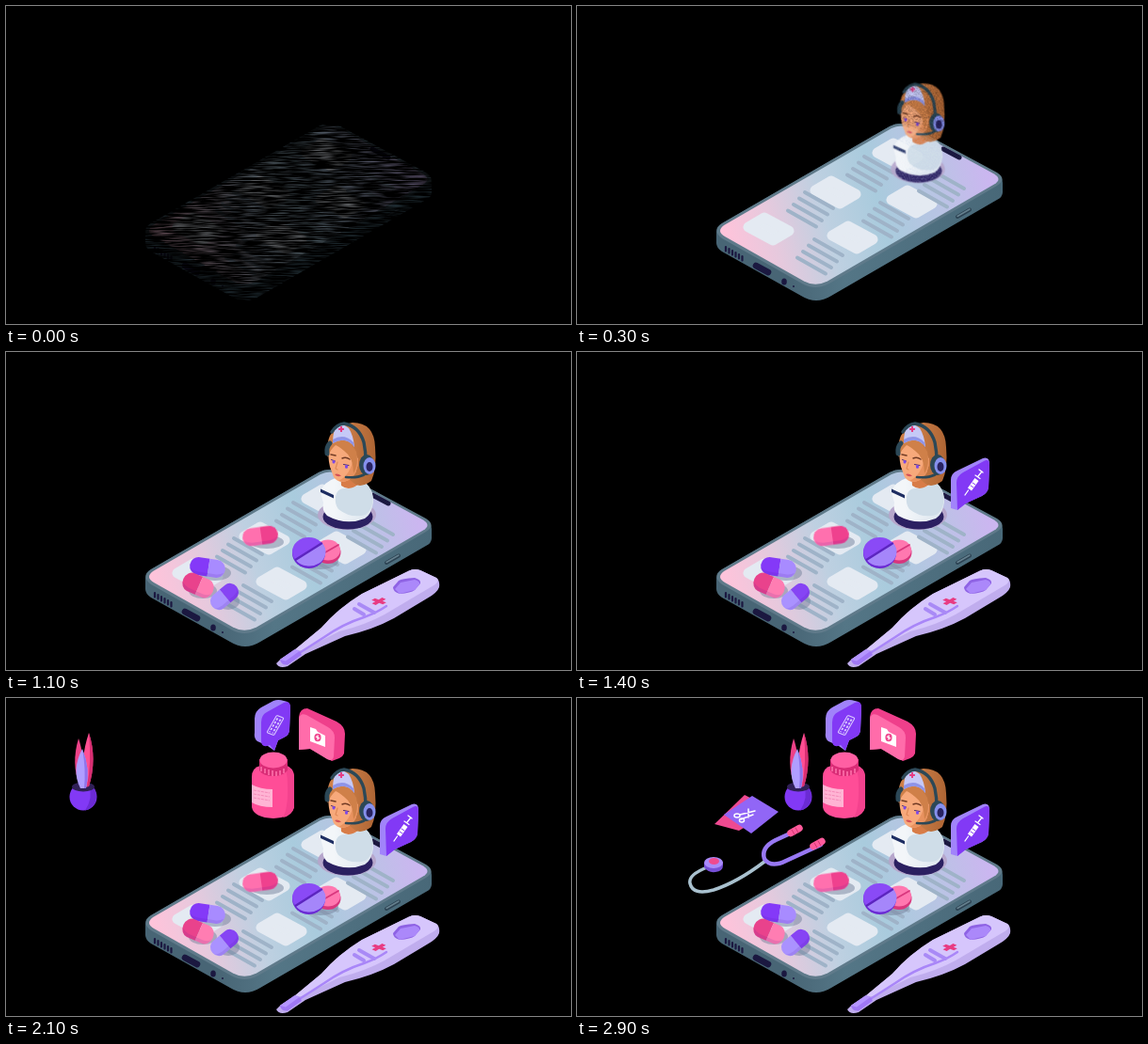
Write an HTML page that moves like this. It is 600 px wide and 338 px high and loops after 3 s.

```html
<!DOCTYPE html>
<html lang="en">
<head>
<meta charset="utf-8">
<title>Online clinic</title>
<style>
html, body { margin: 0; width: 100%; height: 100%; overflow: hidden; background: #000; }
svg { display: block; width: 100vw; height: 100vh; }
.line { fill: none; stroke-linecap: round; stroke-linejoin: round; }
.anim { animation: 3s step-end infinite; }

/* Poses hold for 100 ms each, so every step is 3.33% */
#phone { animation-name: phone; }
@keyframes phone {
  0% { filter: url(#streakThin); }
  3.33% { filter: url(#streakFull); }
  6.66%, 100% { filter: none; }
}
#nurse { animation-name: nurse; transform-origin: 361px 176px; }
@keyframes nurse {
  0% { opacity: 0; }
  6.66% { opacity: 1; transform: scale(.72); filter: url(#grainThin); }
  9.99% { opacity: 1; transform: scale(.93); filter: url(#grainFull); }
  13.33% { opacity: 1; transform: scale(.98); filter: none; }
  16.66%, 100% { opacity: 1; transform: none; filter: none; }
}
#thermo { animation-name: thermo; }
@keyframes thermo {
  0% { opacity: 0; }
  23.33% { opacity: 1; filter: url(#grainThin); }
  26.66%, 100% { opacity: 1; filter: none; }
}
.drop1 { animation-name: drop1; }
@keyframes drop1 {
  0% { opacity: 0; }
  26.66% { opacity: 1; transform: translate(-2px, -155px); }
  29.99% { opacity: 1; transform: translate(-1px, -58px); }
  33.33%, 100% { opacity: 1; transform: none; }
}
.drop2 { animation-name: drop2; }
@keyframes drop2 {
  0% { opacity: 0; }
  29.99% { opacity: 1; transform: translateY(-140px); }
  33.33% { opacity: 1; transform: translateY(-48px); }
  36.66%, 100% { opacity: 1; transform: none; }
}
.shadow { animation-name: shadow; fill: #75819c; fill-opacity: .5; }
@keyframes shadow {
  0% { opacity: 0; }
  36.66%, 100% { opacity: 1; }
}
#syringe { animation-name: syringe; }
@keyframes syringe {
  0% { opacity: 0; }
  43.33% { opacity: .65; transform: translateX(-5px); }
  46.66%, 100% { opacity: 1; transform: none; }
}
#chat { animation-name: chat; }
@keyframes chat {
  0% { opacity: 0; }
  53.33% { opacity: 1; filter: url(#grainFull); }
  56.66%, 100% { opacity: 1; filter: none; }
}
#bottle { animation-name: bottle; }
@keyframes bottle {
  0% { opacity: 0; }
  56.66% { opacity: 1; filter: url(#grainThin); }
  59.99% { opacity: 1; filter: url(#grainFull); }
  63.33%, 100% { opacity: 1; filter: none; }
}
#plant { animation-name: plant; }
@keyframes plant {
  0% { opacity: 0; }
  66.66% { opacity: 1; transform: translate(-174px, 76px); }
  69.99% { opacity: 1; transform: translate(-153px, 0); }
  73.33% { opacity: 1; transform: translate(-120px, -28px); }
  76.66% { opacity: 1; transform: translate(-78px, -37px); }
  79.99% { opacity: 1; transform: translate(-34px, -22px); }
  83.33%, 100% { opacity: 1; transform: none; }
}
#cards { animation-name: cards; }
@keyframes cards {
  0% { opacity: 0; }
  79.99% { opacity: 1; transform: translate(-50px, 108px); }
  83.33% { opacity: 1; transform: translate(-38px, 48px); }
  86.66% { opacity: 1; transform: translate(-14px, 12px); }
  89.99%, 100% { opacity: 1; transform: none; }
}
#scope { animation-name: scope; }
@keyframes scope {
  0% { opacity: 0; }
  93.33% { opacity: .65; transform: translateY(-14px); }
  96.66%, 100% { opacity: 1; transform: none; }
}
</style>
</head>
<body>
<svg viewBox="0 0 600 338" preserveAspectRatio="none">
<defs>
  <linearGradient id="screen" gradientUnits="userSpaceOnUse" x1="156" y1="246" x2="436" y2="174">
    <stop offset="0" stop-color="#ffc3da"/><stop offset=".18" stop-color="#e6c9dd"/>
    <stop offset=".38" stop-color="#bed0e1"/><stop offset=".58" stop-color="#a9cbdd"/>
    <stop offset=".8" stop-color="#b9c4e4"/><stop offset="1" stop-color="#cbb6f0"/>
  </linearGradient>
  <linearGradient id="side">
    <stop offset=".25" stop-color="#486575"/><stop offset=".45" stop-color="#547686"/><stop offset="1" stop-color="#486878"/>
  </linearGradient>
  <linearGradient id="coat">
    <stop offset=".25" stop-color="#f3f6f9"/><stop offset="1" stop-color="#dbe5ee"/>
  </linearGradient>
  <linearGradient id="hair">
    <stop offset=".3" stop-color="#cf8049"/><stop offset="1" stop-color="#ad6534"/>
  </linearGradient>

  <filter id="streakThin" color-interpolation-filters="sRGB">
    <feTurbulence type="fractalNoise" baseFrequency=".04 .75" numOctaves="2" seed="4"/>
    <feColorMatrix values="0 0 0 0 0  0 0 0 0 0  0 0 0 0 0  1 0 0 0 -.42"/>
    <feComposite in="SourceGraphic" operator="in"/>
  </filter>
  <filter id="streakFull" color-interpolation-filters="sRGB">
    <feTurbulence type="fractalNoise" baseFrequency=".04 .75" numOctaves="2" seed="4"/>
    <feColorMatrix values="0 0 0 0 0  0 0 0 0 0  0 0 0 0 0  2 0 0 0 -.4"/>
    <feComposite in="SourceGraphic" operator="in"/>
  </filter>
  <filter id="grainThin" color-interpolation-filters="sRGB">
    <feTurbulence type="fractalNoise" baseFrequency=".9" seed="7"/>
    <feColorMatrix values="0 0 0 0 0  0 0 0 0 0  0 0 0 0 0  .9 0 0 0 -.17"/>
    <feComposite in="SourceGraphic" operator="in"/>
  </filter>
  <filter id="grainFull" color-interpolation-filters="sRGB">
    <feTurbulence type="fractalNoise" baseFrequency=".9" seed="7"/>
    <feColorMatrix values="0 0 0 0 0  0 0 0 0 0  0 0 0 0 0  1.2 0 0 0 .3"/>
    <feComposite in="SourceGraphic" operator="in"/>
  </filter>

  <path id="tile" d="M-21-1-4-11 22 3 5 13Z" fill="#e4eaf2" stroke="#e4eaf2" stroke-width="11" stroke-linejoin="round"/>
  <path id="text" class="line" d="M0 0l30 17M-6 6.500l30 17M-12 13l30 17M-18 19.500l30 17" stroke="#9fb3c8" stroke-width="4"/>
  <path id="cross" d="M-2-6h4v4h4v4h-4v4h-4v-4h-4v-4h4z" fill="#e83b82"/>
  <g id="pill">
    <path d="M1-9.500H-9.500a9.500 9.500 0 0 0 0 19H1Z" fill="var(--a)"/>
    <path d="M1-9.500H9.500a9.500 9.500 0 0 1 0 19H1Z" fill="var(--b)"/>
    <path d="M-18 3Q-15 9.500-9.500 9.500H9.500Q15 9.500 18 3Q14 6 9 6H-9Q-14 6-18 3Z" fill="#4b1595" opacity=".12"/>
  </g>
</defs>

<g id="phone" class="anim">
  <path d="M148 240Q148 234 154 231L332 128Q343 122 355 128L446 178Q452 182 452 188V198Q452 203 446 206L270 308Q254 318 238 308L154 261Q148 257 148 252Z" fill="url(#side)"/>
  <path d="M154 231 332 128Q343 122 355 128L446 177Q457 184 446 191L268 295Q253 303 239 295L154 247Q143 239 154 231Z" fill="#5f7a8a"/>
  <path d="M157 232.500 334 130Q344 125 354 130L443 178.500Q452 184 443 189.500L266 292.500Q253 299 241 292.500L157 245Q147 239 157 232.500Z" fill="url(#screen)"/>
  <use href="#tile" x="203" y="236"/><use href="#tile" x="274" y="197"/>
  <use href="#tile" x="292" y="245"/><use href="#tile" x="355" y="207"/><use href="#tile" x="340" y="157"/>
  <use href="#text" x="242" y="198"/><use href="#text" x="252" y="248"/>
  <use href="#text" x="322" y="209"/><use href="#text" x="305" y="160"/><use href="#text" x="381" y="177"/>
  <g class="line" stroke="#1b1840">
    <path d="M389 152 406 161" stroke-width="5"/>
    <path d="M158 256v4.500m3.500-2.500v4.500m3.500-2.500v4.500m3.500-2.500v4.500m3.500-2.500v4.500m3.500-2.500v4.500" stroke-width="2.200"/>
    <path d="M190 276 203 283" stroke-width="6.600"/>
    <path d="M404 224 417 216.500" stroke="#2c4252" stroke-width="4"/>
    <path d="M404 223.500 417 216" stroke="#66818f" stroke-width="1.500"/>
  </g>
  <ellipse cx="220" cy="293" rx="2.800" ry="3.500" fill="#1b1840"/>
  <circle cx="230" cy="298" r="1" fill="#1b1840"/>
</g>

<g id="nurse" class="anim">
  <ellipse cx="362" cy="173" rx="31" ry="16" fill="#b6a6cb"/>
  <ellipse cx="363" cy="175" rx="26.500" ry="13.500" fill="#2b2061"/>
  <path d="M334 149Q337 138 350 134L378 137Q391 145 390 160Q388 173 381 177Q361 185 341 174Q335 168 337 160Z" fill="url(#coat)"/>
  <path d="M350 154Q351 144 362 145Q371 144 382 139Q391 147 389 161Q386 173 378 174Q364 176 353 167Q349 162 350 154Z" fill="#cfdde8"/>
  <path d="M334 145.500 348 152V155.500L334 149Z" fill="#1e2e62"/>
  <path d="M355 128 374 126 376 139Q365 149 356 142Z" fill="#d87c47"/>
  <path d="M344 89Q351 77 368 75Q391 75 392 101Q394 124 388 137Q377 145 370 140L346 120Q338 102 344 89Z" fill="url(#hair)"/>
  <path d="M344 101Q354 93 366 98L374 114Q374 130 364 136Q354 141 348 133L344 122Q341 110 344 101Z" fill="#f7a97b"/>
  <path d="M374 114Q374 130 364 136Q358 139 353 137Q366 131 369 112Z" fill="#e8925f"/>
  <path d="M341 112Q341 98 351 93Q365 92 372 106Q375 119 369 129Q369 112 359 105Q353 100 350 99Q345 103 341 112Z" fill="#cf8049"/>
  <path class="line" d="M345 109 350 110M357 113Q361 111 365 114" stroke="#713b25" stroke-width="1.500"/>
  <path class="line" d="M345.500 114.500 349.500 116M358.500 119.500 364 120.500" stroke="#4a2a74" stroke-width="1"/>
  <path class="line" d="M348 116.500v.6M361.500 121.500v.8" stroke="#7d48e8" stroke-width="3"/>
  <path class="line" d="M352 117 350 124 352 125" stroke="#e08a5a" stroke-width="1.200"/>
  <path d="M349 130Q352 128.500 356 131.500Q352 133.500 349 130Z" fill="#d34f56"/>
  <path d="M347 97Q347 82 352 79Q358 75 364 81Q369 89 370 101Q361 89 347 97Z" fill="#c6c9f7"/>
  <path d="M347 97Q361 89 370 101L369 96Q359 86 347 93Z" fill="#8f94e8"/>
  <use href="#cross" transform="translate(356 82) scale(.48)"/>
  <g class="line" stroke="#2c4857">
    <path d="M344 97Q340 101 341 108" stroke-width="5"/>
    <path d="M346 85Q351 77 359 76Q375 79 380 96Q382 106 382 115" stroke-width="3.400"/>
    <path d="M386 123Q382 135 361 133" stroke-width="2.600"/>
  </g>
  <ellipse cx="383" cy="120" rx="8" ry="11" fill="#2c4857"/>
  <ellipse cx="386" cy="121" rx="6.500" ry="9" fill="#8690ed"/>
  <ellipse cx="386" cy="122" rx="3.500" ry="5" fill="#292361"/>
</g>

<g id="thermo" class="anim">
  <path d="M287 331 292 326 306 317 335 293Q352 273 378 257L428 232.500Q434 230 440 232L457 240Q461 243 460 250Q458 256 447 262L412 283Q390 295 360 302L318 321 299 334Q290 337 287 331Z" fill="#c0adee"/>
  <path d="M306 317 335 293Q352 273 378 257L428 232.500Q434 230 440 232L457 240Q461 243 456 247L402 279Q382 290 354 297L314 317Z" fill="#d6c6fc"/>
  <path class="line" d="M313 319 338 303Q358 289 380 282Q394 277 404 270" stroke="#a986f8" stroke-width="2.400"/>
  <path d="M291 327 306 316.500Q312 316 314 322L299 332.500Q292 333 291 327Z" fill="#a078f5"/>
  <path d="M291 327 306 316.500Q309 316 311.500 318L297 328.500Z" fill="#b596ff"/>
  <path d="M411 250 417 243Q420 241 434 240Q441 242 440 246L434 253Q430 256 418 257Q411 255 411 250Z" fill="#8e62e4"/>
  <path d="M413 252 419 245 434 242Q440 244 439 247L434 253 418 257Z" fill="#ab88fa"/>
  <use href="#cross" transform="matrix(1 .38 -.9 .52 396 265)"/>
  <path class="line" d="M375 268 391 277M370 273 380 279" stroke="#a98af6" stroke-width="4"/>
</g>

<g class="anim shadow">
  <ellipse cx="277" cy="202" rx="18" ry="7"/><ellipse cx="222" cy="235" rx="17" ry="8"/>
  <ellipse cx="209" cy="254" rx="15" ry="8"/><ellipse cx="236" cy="265" rx="12" ry="9"/>
  <ellipse cx="334" cy="222" rx="19" ry="9"/>
</g>
<g class="anim drop1"><use href="#pill" transform="translate(270 195.500) rotate(-8)" style="--a:#ff70ae;--b:#ef418e"/></g>
<g class="anim drop2">
  <ellipse cx="342" cy="213" rx="13.500" ry="12" fill="#d8367d"/>
  <ellipse cx="342" cy="210.500" rx="13" ry="11" fill="#ff78b0"/>
  <path class="line" d="M332 217 353 205" stroke="#d8367d" stroke-width="1.800"/>
  <ellipse cx="321.500" cy="214" rx="17.500" ry="16" fill="#6b2bd4"/>
  <ellipse cx="321.500" cy="212" rx="17.500" ry="15" fill="#8a4af6"/>
  <path d="M308 221.500 336 203.500A17.500 15 0 0 1 308 221.500Z" fill="#a586fa"/>
  <path class="line" d="M308 220.500 335 203.500" stroke="#5c25bf" stroke-width="2.400"/>
  <use href="#pill" transform="translate(214 229) rotate(9)" style="--a:#8439f8;--b:#a88bff"/>
  <use href="#pill" transform="translate(204 248) rotate(24) scale(.9 1.080)" style="--a:#e9428c;--b:#ff7db2"/>
  <use href="#pill" transform="translate(232 260) rotate(-40) scale(.88 .95)" style="--a:#aa92ff;--b:#8644f4"/>
</g>

<g id="syringe" class="anim">
  <path d="M397 166V136Q397 129 404 126L431 113Q438 111 438 119L437 144Q436 150 430 153L412 161 404 168Z" fill="#a184fa"/>
  <path d="M404 168 403 139Q403 132 410 128L432 116Q438 113 438 120L437 144Q436 150 430 153L413 161Z" fill="#8239f5"/>
  <g class="line" stroke="#fff">
    <path d="M412 152 415.500 147M426 132 430 127M427 125 431 128M423 131 428 134.500" stroke-width="1.300"/>
    <path d="M417 146 424.500 135.500" stroke-width="5" stroke-linecap="butt"/>
    <path d="M418 142 421 144M420 139 423 141" stroke="#8239f5"/>
  </g>
</g>

<g id="chat" class="anim">
  <path d="M264 22Q264 14 271 10L284 3Q289 1 295 3Q302 4 302 10L301 34Q301 39 295 42L289 45 285 56 278 51 267 46Q263 43 264 37Z" fill="#a083fa"/>
  <path d="M271 26Q271 18 277 15L295 5Q302 2 302 10L301 34Q301 39 295 42L289 45 285 56 280 50Q271 54 271 45Z" fill="#8239f5"/>
  <g transform="translate(286 29) rotate(30) skewY(-8)">
    <rect x="-4" y="-10.500" width="8" height="21" rx="1" fill="none" stroke="#d9c8ff"/>
    <path d="M-1.700-8V9M1.700-8V9" stroke="#d9c8ff" stroke-width="1.800" stroke-dasharray="2.500 1.500"/>
  </g>
  <path d="M311 55V20Q312 11 320 11L351 25Q360 30 360 38L359 59Q358 62 354 64L346 67 323 54Z" fill="#ef3f8b"/>
  <path d="M311 55V23Q312 15 319 18L342 31Q349 35 349 42L348 62Q347 68 341 65L323 54Z" fill="#ff6caa"/>
  <path d="M323 31 329 33 331 36 339 40V52L323 46Z" fill="#fff"/>
  <ellipse cx="331" cy="42" rx="3.600" ry="4.200" fill="#f0478f"/>
  <path d="M329 41 333 43M331 39.500V44.500" stroke="#fff" stroke-width="1.300"/>
</g>

<g id="bottle" class="anim">
  <path d="M261 84Q261 74 270 72L296 71Q306 74 306 84V116Q303 127 284 128Q263 127 261 116Z" fill="#ff4d97"/>
  <path d="M294 72Q306 74 306 84V116Q304 125 294 127Q300 117 299 91Q299 78 294 72Z" fill="#f4428e"/>
  <path d="M269 65H299V77Q294 83 284 83Q273 83 269 77Z" fill="#d92c76"/>
  <path d="M271 73v5m4-3v5m4-4v6m4-5v6m4-5v5m4-6v5m4-7v5" stroke="#ff75ae" stroke-width="1.500"/>
  <ellipse cx="284" cy="66" rx="14.500" ry="8.500" fill="#ff5fa3"/>
  <path d="M261 92Q270 97 283 97V116Q269 116 261 111Z" fill="#ffb4d4"/>
  <path d="M263 98 280 101M263 102 280 105M263 106 280 109" stroke="#f48bb9" stroke-dasharray="3 1"/>
</g>

<g id="plant" class="anim">
  <ellipse cx="235" cy="105" rx="14.500" ry="14.500" fill="#8239f5"/>
  <path d="M241 91Q250 96 249 106Q248 117 237 119.500Q246 106 241 91Z" fill="#6b2bd4"/>
  <ellipse cx="235" cy="94.500" rx="12" ry="5" fill="#302057"/>
  <path d="M236 95Q231 67 241 37Q250 65 241 94Z" fill="#ff4f92"/>
  <path d="M241 37Q250 65 241 94L239 94Q244 70 241 37Z" fill="#d82e72"/>
  <path d="M231 92Q222 70 230 43Q236 59 235 89Z" fill="#ee4288"/>
  <path d="M232 96Q222 77 234 54Q243 76 238 96Z" fill="#b09eff"/>
  <path d="M234 54Q243 76 238 96H236Q238 75 234 54Z" fill="#8f74ed"/>
</g>

<g id="cards" class="anim">
  <path d="M146 134 178 103 209 119 172 141Z" fill="#ef4a91"/>
  <path d="M156 124 186 104 214 121 185 144Z" fill="#9166f6"/>
  <g class="line" stroke="#fff" stroke-width="1.500">
    <path d="M173 124 189 120M174 129 187 124M182 118V127"/>
    <ellipse cx="170" cy="125" rx="3" ry="2"/><ellipse cx="175" cy="130" rx="2.500" ry="2"/>
  </g>
</g>

<g id="scope" class="anim">
  <g class="line">
    <path d="M138 180Q118 188 120 197Q123 210 145 204Q170 196 199 174" stroke="#a9c1cf" stroke-width="3.500"/>
    <path d="M235 140 211 151Q195 159 199 171Q206 181 222 173L259 156" stroke="#9878f3" stroke-width="4.500"/>
    <path d="M227 143.500 236 138.500M251 157.500 260 152.500" stroke="#ff5a9b" stroke-width="7.500"/>
    <path d="M228 140l3 5m1-7 3 5M252 154l3 5m1-7 3 5" stroke="#cf346f"/>
  </g>
  <path d="M135 175V180Q139 186 147 185Q155 184 155 178V174Z" fill="#7650d7"/>
  <ellipse cx="145" cy="175" rx="10" ry="6" fill="#a98bfa"/>
  <ellipse cx="145.500" cy="173.500" rx="5.500" ry="3.500" fill="#f04a8e"/>
</g>
</svg>
</body>
</html>
```
